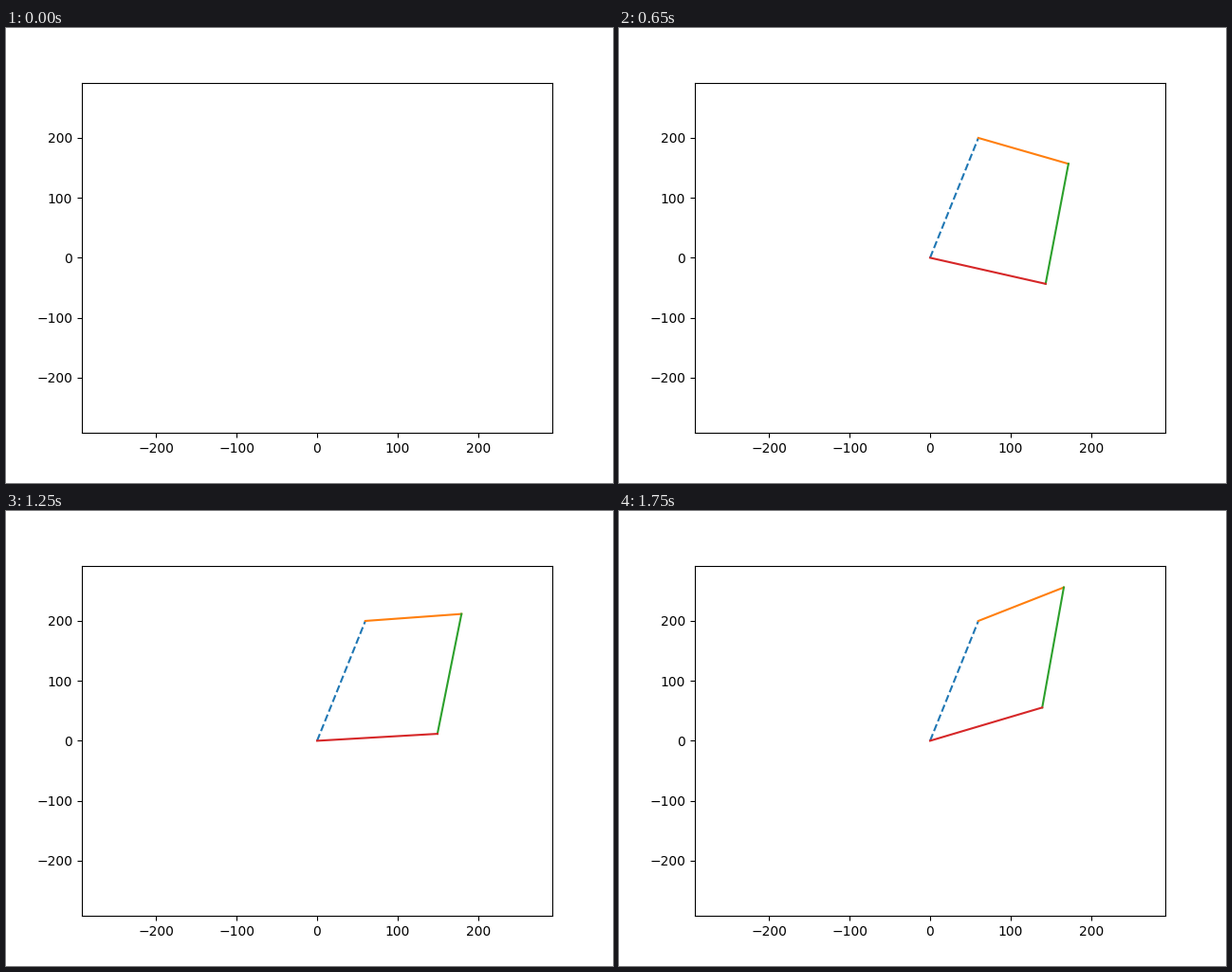
Recreate the animation shown at these times as a matplotlib script. Size 640x480 px, loop 1.8 s.

```python
import numpy as np
import matplotlib.pyplot as plt
from matplotlib.animation import FuncAnimation

# Four-bar linkage: two fixed pivots, two arms and the link joining them
LOWER_PIVOT = np.array([0.0, 0.0])
UPPER_PIVOT = np.array([60.0, 200.0])
LOWER_ARM, UPPER_ARM = 150.0, 120.0
LINK = np.hypot(30, 200)

FRAMES, INTERVAL = 36, 50
START, END = np.radians([-50, 30])

fig, ax = plt.subplots(figsize=(6.4, 4.8), dpi=100)
lim = 1.4 * np.hypot(*UPPER_PIVOT)
ax.set_xlim(-lim, lim)
ax.set_ylim(-lim, lim)

base, = ax.plot([], [], "--", color="C0")
upper, = ax.plot([], [], color="C1")
link, = ax.plot([], [], color="C2")
lower, = ax.plot([], [], color="C3")
bars = [base, upper, link, lower]


def joints(angle):
    """Return the outer joints of the upper and lower arms."""
    top = UPPER_PIVOT + UPPER_ARM * np.array([np.cos(angle), np.sin(angle)])
    reach = top - LOWER_PIVOT
    dist = np.hypot(*reach)
    ux, uy = reach / dist
    along = (LOWER_ARM**2 + dist**2 - LINK**2) / (2 * dist)
    across = np.sqrt(LOWER_ARM**2 - along**2)
    bottom = LOWER_PIVOT + along * np.array([ux, uy]) + across * np.array([uy, -ux])
    return top, bottom


def update(i):
    if i == 0:  # each loop opens on empty axes
        for bar in bars:
            bar.set_data([], [])
        return bars
    top, bottom = joints(START + (END - START) * i / FRAMES)
    ends = [(LOWER_PIVOT, UPPER_PIVOT), (UPPER_PIVOT, top),
            (top, bottom), (bottom, LOWER_PIVOT)]
    for bar, (p, q) in zip(bars, ends):
        bar.set_data([p[0], q[0]], [p[1], q[1]])
    return bars


anim = FuncAnimation(fig, update, frames=FRAMES, interval=INTERVAL,
                     repeat=True, repeat_delay=0)
plt.show()
```
